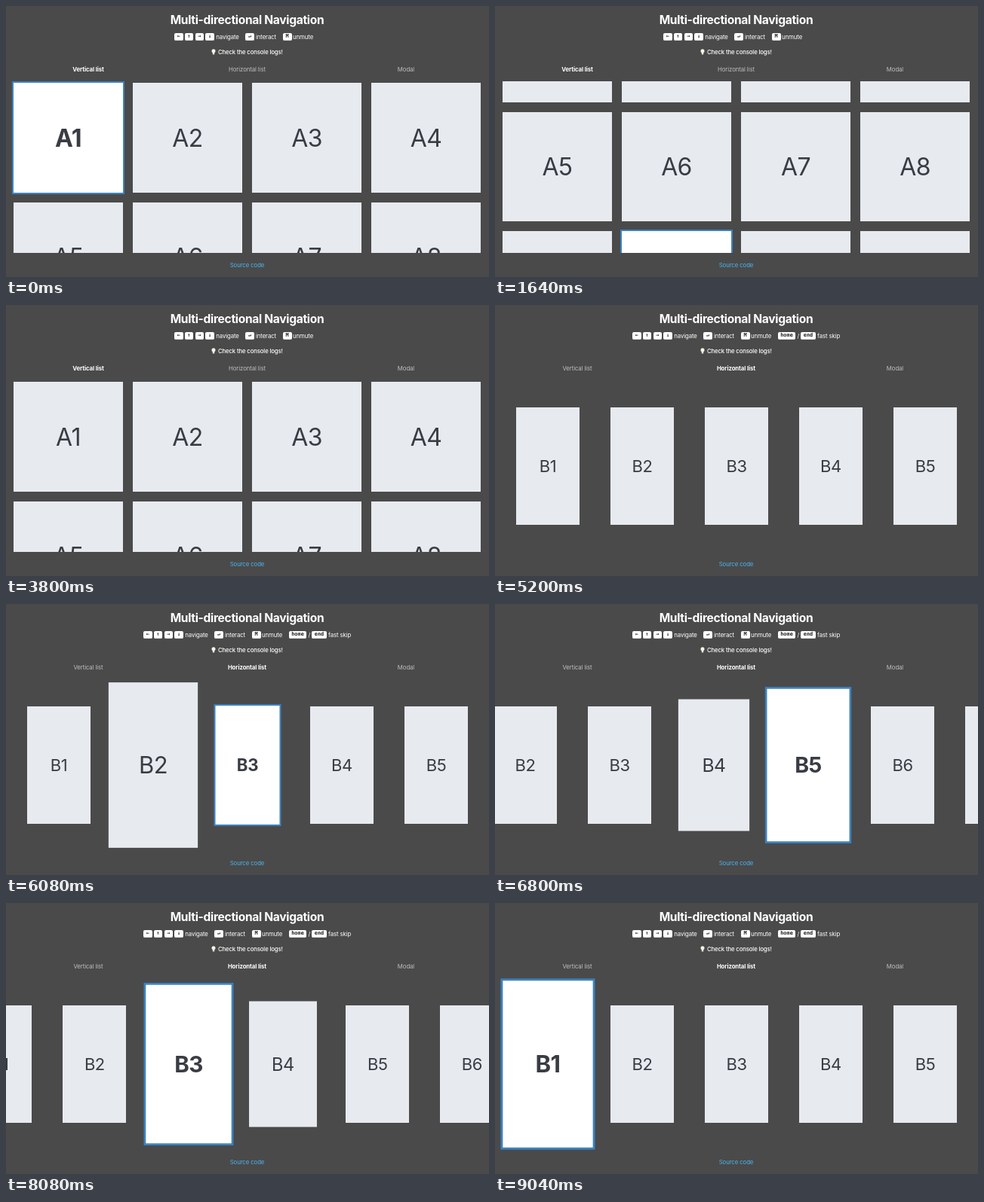
An HTML page that plays this animation: 640 px wide and 360 px high, repeating every 9.2 s.

```html
<!DOCTYPE html>
<html lang="en">
<head>
<meta charset="utf-8">
<title>Multi-directional Navigation</title>
<style>
html, body { margin: 0; width: 100%; height: 100%; overflow: hidden; background: #4a4a4a; }
#stage { position: relative; width: 640px; height: 360px; overflow: hidden; color: #fff;
  font: 7.8px/12px Inter, "Open Sans", sans-serif; letter-spacing: -.1px; }
#stage div, #stage svg { position: absolute; white-space: nowrap; }
.mid { transform: translate(-50%, -50%); }
.left { transform: translateY(-50%); }
.title { font-size: 15.6px; font-weight: 700; letter-spacing: -.33px; }
.check { font-weight: 500; letter-spacing: -.16px; }
.tab { color: #bebebe; }
.tab.on { color: #fff; font-weight: 700; }
.link { color: #4ab3ef; }
#stage .key, #stage .card { display: flex; align-items: center; justify-content: center; box-sizing: border-box; }
.key { top: 35.5px; height: 10.5px; background: #fff; color: #222; border-radius: 2px;
  border-bottom: 1px solid #d5d8dd; letter-spacing: 0;
  font: 700 6.9px/9px "DejaVu Sans Mono", monospace; }
.panel { left: 0; width: 640px; top: 99.5px; height: 228.5px; overflow: hidden; }
.card { background: #e7eaef; color: #393c43; }
.card.on { background: #fff; font-weight: 700; box-shadow: 0 0 0 2px #3b83c3; z-index: 1; }
#listA .card { width: 145px; height: 145.5px; padding-top: 2px; font-size: 32px; letter-spacing: -.6px; }
#listB .card { width: 84px; height: 156px; top: 36.25px; font-size: 22px; letter-spacing: -.4px; }
</style>
</head>
<body>
<div id="stage"></div>
<script>
const LOOP = 9200, SWITCH = 4710, SCROLL = 310, GROW = 250;
const stage = document.getElementById('stage');

function add(parent, cls, x, y, text = '') {
  const el = document.createElement('div');
  el.className = cls;
  if (x != null) el.style.left = x + 'px';
  if (y != null) el.style.top = y + 'px';
  el.textContent = text;
  parent.append(el);
  return el;
}

// Header
add(stage, 'mid title', 319.5, 18.5, 'Multi-directional Navigation');
stage.insertAdjacentHTML('beforeend',
  `<svg style="left:271px;top:56px" width="8" height="10" fill="#f6f3e6">
    <circle cx="4" cy="3.8" r="2.5"/><path d="M2.8 5h2.4v3.4h-2.4z"/></svg>`);
add(stage, 'left check', 281, 61, 'Check the console logs!');
const tabs = ['Vertical list', 'Horizontal list', 'Modal']
  .map((name, i) => add(stage, 'mid tab', 109 + 210.5 * i, 83.5, name));
add(stage, 'mid link', 319.5, 344, 'Source code');

// Key hints: [x, text, key width]; entries without a width are plain words
const hints = [[0, '←', 11.5], [13.7, '↑', 11.5], [27.5, '→', 11.5], [41.3, '↓', 11.5], [55.3, 'navigate'],
  [94, '↵', 12], [108, 'interact'], [143.5, 'M', 12], [157, 'unmute']];
const skipHints = [[193, 'home', 23], [218.5, '/'], [223, 'end', 20], [245, 'fast skip']];

function hintRow(x, list) {
  const row = add(stage, '', x, 0);
  for (const [left, text, width] of list) {
    if (width) add(row, 'key', left, null, text).style.width = width + 'px';
    else add(row, 'left', left, 40.5, text);
  }
  return row;
}

// Panels
function panel(id) {
  const el = add(stage, 'panel');
  el.id = id;
  return el;
}
const listA = panel('listA'), listB = panel('listB');
const range = n => [...Array(n).keys()];
const cardsA = range(16).map(i => add(listA, 'card', 10 + 158 * (i % 4), 0, 'A' + (i + 1)));
const cardsB = range(10).map(i => add(listB, 'card', 0, null, 'B' + (i + 1)));
const views = [
  [listA, hintRow(223, hints)],
  [listB, hintRow(182, [...hints, ...skipHints])]
];

// Focus moves: [time, card number], 0 = none
const movesA = [[0, 1], [755, 2], [990, 6], [1632, 10], [2030, 9], [2270, 5], [2790, 1], [3790, 0]];
const movesB = [[0, 0], [5300, 1], [5680, 2],
  ...[3, 4, 5, 6, 5, 4, 3, 2, 1].map((n, i) => [6070 + 313 * i, n])];

function focusAt(moves, t) {
  const k = moves.findLastIndex(m => m[0] <= t);
  return { cur: moves[k][1], prev: k ? moves[k - 1][1] : moves[0][1], dt: t - moves[k][0] };
}

const bezier = (x1, y1, x2, y2) => x => {
  if (x <= 0) return 0;
  if (x >= 1) return 1;
  const at = (a, b, s) => 3 * a * s * (1 - s) ** 2 + 3 * b * s * s * (1 - s) + s ** 3;
  let lo = 0, hi = 1;
  for (let i = 0; i < 24; i++) {
    const s = (lo + hi) / 2;
    if (at(x1, x2, s) < x) lo = s; else hi = s;
  }
  return at(y1, y2, lo);
};
const ease = bezier(.25, .1, .25, 1), easeInOut = bezier(.42, 0, .58, 1);

const offsetA = n => n > 4 ? 119.5 + 158.5 * (((n - 1) >> 2) - 1) : 0;
const offsetB = n => 125 * Math.max(0, n - 3);

function scrollPos({ cur, prev, dt }, offset) {
  const from = offset(prev);
  return from + (offset(cur) - from) * easeInOut(dt / SCROLL);
}

function draw(t) {
  const view = t < SWITCH ? 0 : 1;
  views.forEach((els, i) => els.forEach(el => el.style.display = i === view ? '' : 'none'));
  tabs.forEach((el, i) => el.classList.toggle('on', i === view));

  const a = focusAt(movesA, t), top = scrollPos(a, offsetA);
  cardsA.forEach((el, i) => {
    el.classList.toggle('on', i + 1 === a.cur);
    el.style.top = 2.5 + 158.5 * (i >> 2) - top + 'px';
  });

  const b = focusAt(movesB, t), left = scrollPos(b, offsetB), grow = ease(b.dt / GROW);
  cardsB.forEach((el, i) => {
    const n = i + 1, size = n === b.cur ? grow : n === b.prev ? 1 - grow : 0;
    el.classList.toggle('on', n === b.cur);
    el.style.left = 28 + 125 * i - left + 'px';
    el.style.transform = `scale(${1 + .42 * size})`;
  });
}

function tick() {
  draw(performance.now() % LOOP);
  requestAnimationFrame(tick);
}
tick();
</script>
</body>
</html>
```
